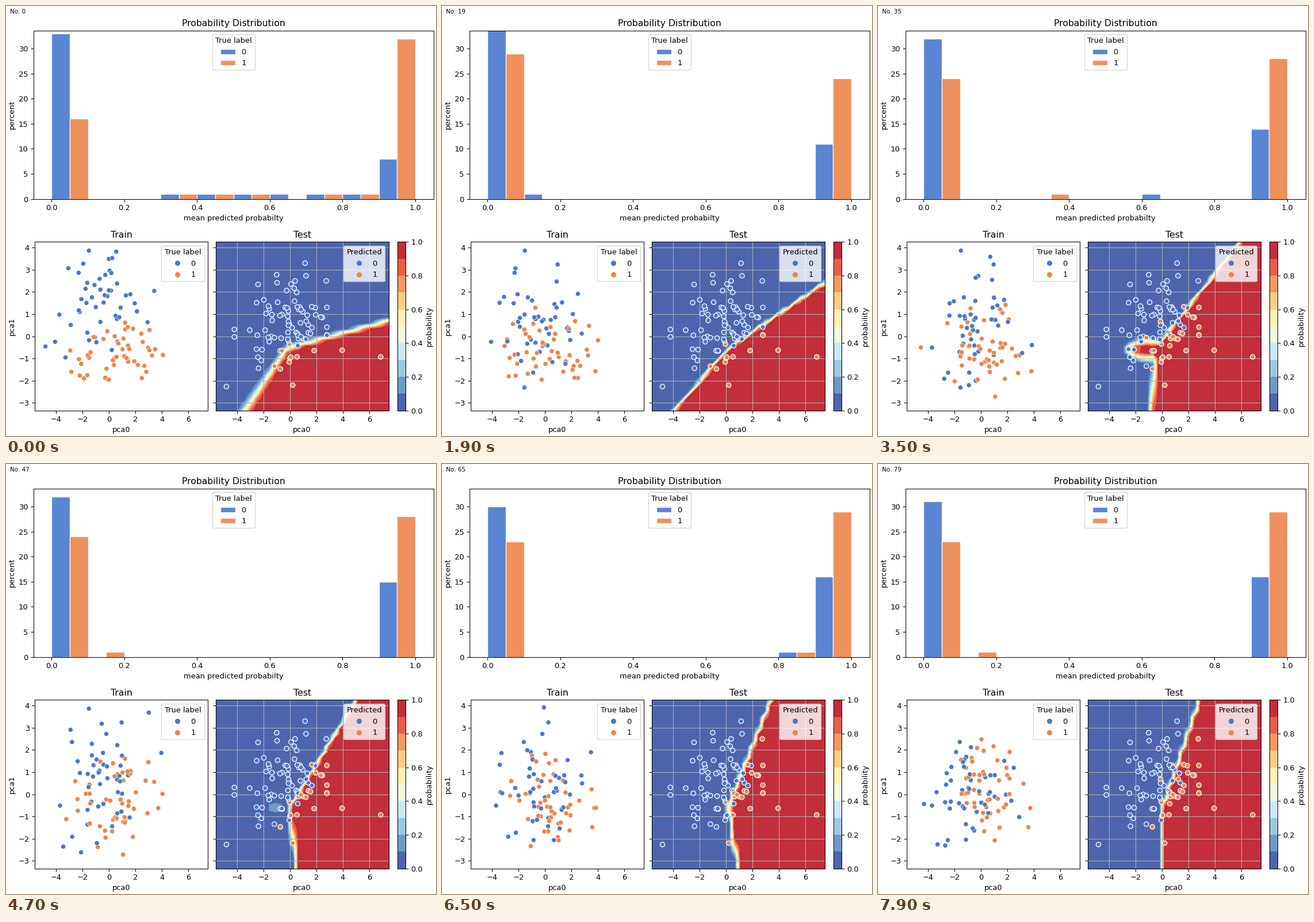
Animation, 748 px wide and 748 px high, one loop 8000 ms. Source, as a matplotlib script:

```python
import numpy as np
import matplotlib.pyplot as plt
from matplotlib.animation import FuncAnimation
from matplotlib.cm import ScalarMappable
from matplotlib.colors import BoundaryNorm, ListedColormap, to_rgba
from matplotlib.lines import Line2D

SIZE, STEPS = 748, 80
COLORS = "#4878D0", "#EE854A"
HUES = np.array([to_rgba(c) for c in COLORS])
XLIM, YLIM = (-5.62, 7.47), (-3.35, 4.26)
ASPECT = .6             # pixels per x unit over pixels per y unit
TOTALS = 47, 53         # test points of each true class
SLOTS, LIFE = 48, 10    # training points per class, mean life in steps

# The boundary is two rays from a hinge; both turn as the data drift
KEYS = [0, 11, 19, 35, 47, 65, 79]
UPPER = [15, 37, 34, 51, 58, 68, 71]
LOWER = [236, 243, 229, 267, 275, 279, 269]
HINGE = [-.2, .3, .2, -.5, .05, .2, .1]
HINGE_Y = -.55

# Mean x, y and spread x, y of new training points, first and last step
DRIFT = np.array([[(0, 1.2, 2, 1.5), (-1, 0, 1.6, 1.3)],
                  [(.3, -.85, 1.9, .8), (.7, .1, 1.5, 1.1)]])

plt.rcParams.update({"font.family": "DejaVu Sans", "font.size": 10})
rng = np.random.default_rng(7)


def margin(x, y, n):
    """Signed distance to the boundary at step n, positive in class 1."""
    up, low, hx = (np.interp(n, KEYS, row) for row in (UPPER, LOWER, HINGE))
    px, py = (x - hx) * ASPECT, y - HINGE_Y
    dist = np.inf
    for angle in np.radians([up, low]):
        ux, uy = np.cos(angle), np.sin(angle)
        t = np.maximum(0, px * ux + py * uy)
        dist = np.minimum(dist, np.hypot(px - t * ux, py - t * uy))
    turn = (up - np.degrees(np.arctan2(py, px))) % 360
    return np.where(turn < (up - low) % 360, dist, -dist)


def probability(x, y, n):
    early = np.exp(-n / 4)
    left = np.interp(x, [-3.5, 1], [1, .25])
    z = margin(x, y, n) / (.03 + .1 * early * left)
    # A pocket of class 1 opens left of the hinge and closes again
    pocket = ((x + 1.1) / .8) ** 2 + ((y + .6) / .22) ** 2
    z = np.maximum(z, 3 - .031 * (n - 35) ** 2 - pocket)
    return 1 / (1 + np.exp(-np.clip(z, -30, 30)))


def lifetimes(hue):
    """Rows of birth, death, x, y, hue; a slot is refilled when it dies."""
    rows = []
    for _ in range(SLOTS):
        birth = 0
        while birth < STEPS:
            death = birth + 1 + int(rng.exponential(LIFE))
            first, last = DRIFT[hue]
            mx, my, sx, sy = first + (last - first) * birth / STEPS
            rows.append((birth, death, rng.normal(mx, sx),
                         rng.normal(my, sy), hue))
            birth = death
    return rows


def histogram(n):
    """Ten counts per class: confident ends and a few points between."""
    local = np.random.default_rng(n)
    high = (np.interp(n, [0, 35, 65], [8, 14, 16]),
            np.interp(n, [0, 11, 35, 79], [32, 22, 28, 29]))
    counts = np.zeros((2, 10))
    for row, top, total, extra in zip(counts, high, TOTALS, (6, 5)):
        loose = round(extra * np.exp(-n / 4)) + (local.random() < .6)
        np.add.at(row, local.permutation(np.arange(1, 9))[:loose], 1)
        row[9] = round(top)
        row[0] = total - row.sum()
    return counts


train = rng.permutation(np.array(lifetimes(0) + lifetimes(1)))

outliers = [(1.15, 3.3), (-1, 2.78), (1.22, 2.73), (-4.8, -2.27),
            (3.95, -.63), (6.87, -.93)]
cloud = rng.normal((-.2, .15), (1.6, 1.15), (86, 2))
cloud = np.clip(cloud, (-4.2, -2.35), (2.8, 2.5))
test = np.vstack([cloud, outliers])
# Features hidden by the projection push each prediction to one side
hidden = rng.normal(0, .5, len(test))

gx, gy = np.meshgrid(np.linspace(*XLIM, 30), np.linspace(*YLIM, 30))

fig = plt.figure(figsize=(8, 8), dpi=SIZE / 8, facecolor="white")


def panel(x0, y0, x1, y1):
    return fig.add_axes([x0 / SIZE, 1 - y1 / SIZE,
                         (x1 - x0) / SIZE, (y1 - y0) / SIZE])


def dot_legend(ax, title):
    dots = [Line2D([], [], ls="", marker="o", ms=7, mew=0, color=c)
            for c in COLORS]
    ax.legend(dots, ["0", "1"], title=title, loc="upper right")


number = fig.text(7 / SIZE, 1 - 13 / SIZE, "", fontsize=8)

ax_hist = panel(47.6, 42.6, 743.6, 335.6)
ax_hist.set(xlim=(-.05, 1.05), ylim=(0, 33.6), ylabel="percent",
            xlabel="mean predicted probabilty", title="Probability Distribution")
bars = [ax_hist.bar(np.arange(10) / 10 + .05 * hue, np.zeros(10), .05,
                    align="edge", color=c, alpha=.9, edgecolor="w", lw=1,
                    label=str(hue))
        for hue, c in enumerate(COLORS)]
ax_hist.legend(title="True label", loc="upper center")

ax_train = panel(50, 410.4, 351, 703.6)
ax_test = panel(364.6, 410.4, 665.6, 703.6)
for ax, title in ((ax_train, "Train"), (ax_test, "Test")):
    ax.set(xlim=XLIM, ylim=YLIM, xlabel="pca0", title=title,
           xticks=range(-4, 7, 2), yticks=range(-3, 5))
ax_train.set_ylabel("pca1")
ax_test.tick_params(labelleft=False)
ax_test.grid(True)
dot_legend(ax_train, "True label")
dot_legend(ax_test, "Predicted")
train_dots = ax_train.scatter([], [], s=40, edgecolors="w", linewidths=.5)
test_dots = ax_test.scatter(*test.T, s=40, edgecolors="w", linewidths=1,
                            zorder=2)

levels = np.linspace(0, 1, 11)
bands = plt.get_cmap("RdYlBu_r")(levels[:-1] + .05)
scale = ScalarMappable(BoundaryNorm(levels, 10), ListedColormap(bands))
cbar = fig.colorbar(scale, cax=panel(680.6, 410.4, 695.2, 703.6), alpha=.9,
                    ticks=levels[::2], format="%.1f", label="probability")
cbar.minorticks_off()
shown = []


def update(n):
    number.set_text(f"No. {n}")

    for group, heights in zip(bars, histogram(n)):
        for bar, h in zip(group, heights):
            bar.set_height(h)

    alive = train[(train[:, 0] <= n) & (n < train[:, 1])]
    train_dots.set_offsets(alive[:, 2:4])
    train_dots.set_facecolors(HUES[alive[:, 4].astype(int)])

    predicted = margin(*test.T, n) + hidden > 0
    test_dots.set_facecolors(HUES[predicted.astype(int)])

    while shown:
        shown.pop().remove()
    shown.append(ax_test.contourf(gx, gy, probability(gx, gy, n),
                                  levels=levels, colors=bands, alpha=.9))
    return []


anim = FuncAnimation(fig, update, frames=STEPS, interval=100,
                     init_func=lambda: [], repeat=True, repeat_delay=0)
plt.show()
```
